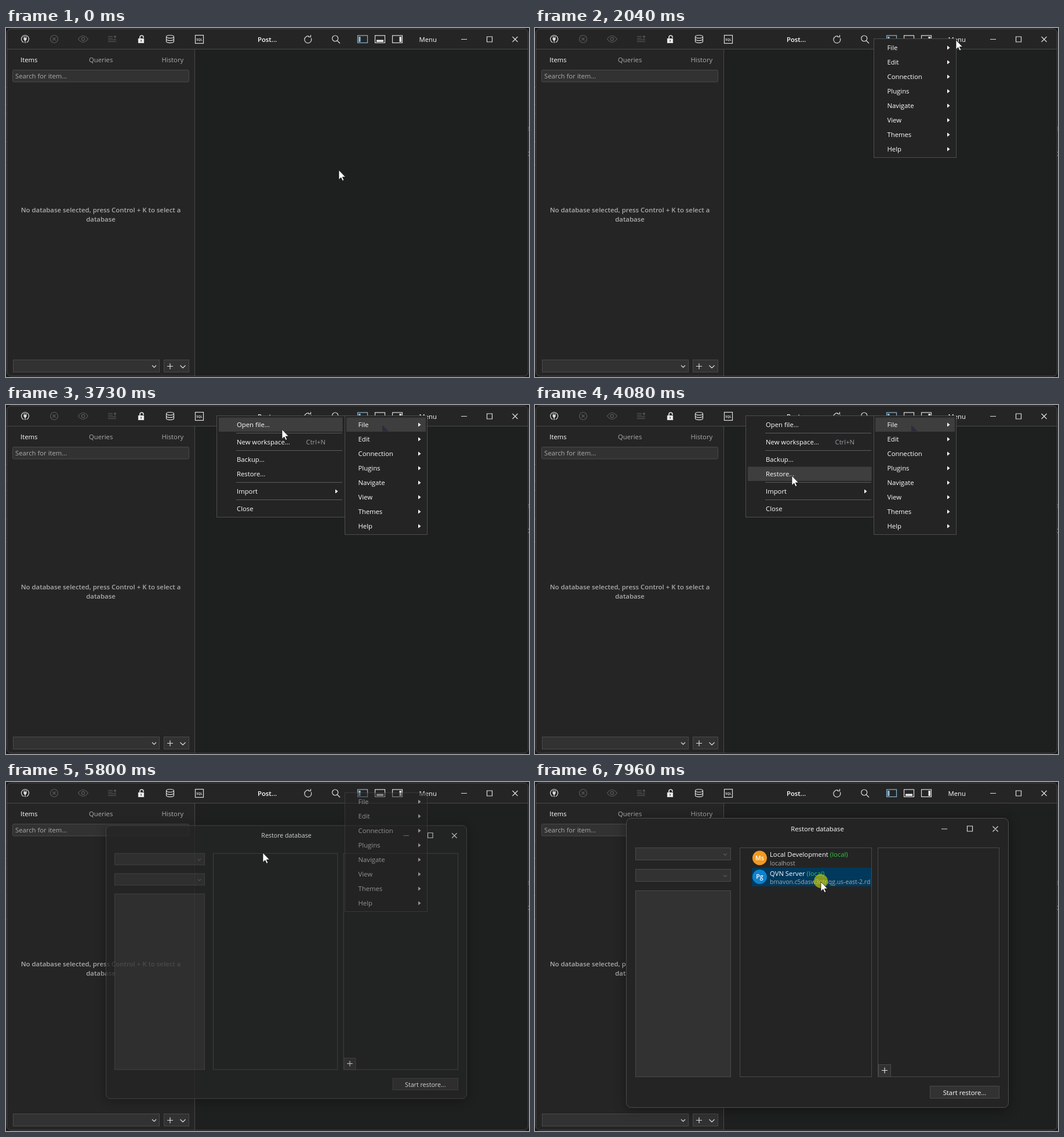
Recreate the animation shown at these times as an HTML page. Size 902x602 px, loop 8 s.

```html
<!DOCTYPE html>
<html lang="en">
<head>
<meta charset="utf-8">
<title>Restore database</title>
<style>
html, body { margin: 0; width: 100%; height: 100%; overflow: hidden; background: #191919; }
svg { display: block; width: 902px; height: 602px; font: 500 11.3px "Open Sans", "Noto Sans", sans-serif; fill: #fff; }
text { white-space: pre; }
.line { fill: none; stroke: #dedede; stroke-width: 1.2; }
.dim { stroke: #595959; }
.field { fill: #323232; stroke: #4a4a4a; }
.frame { fill: none; stroke: #4a4a4a; }
.panel { fill: #242424; stroke: #4d4d4d; }
.hot { fill: #3e3e3e; }
.mid { text-anchor: middle; }
.semi { font-weight: 600; }
.gray { fill: #acacac; }
.sub { font-size: 10.45px; fill: #a9a9a9; }
.local { fill: #31c944; }
</style>
</head>
<body>
<svg viewBox="0 0 902 602">
  <!-- slivers of the desktop behind the window -->
  <path stroke="#444" d="M0 102.5h2M0 131.5h2M0 147.5h2M0 196.5h2M0 236.5h2"/>
  <text class="gray" x="899" y="177">a</text>
  <text class="gray" x="899" y="221">C</text>

  <!-- main window -->
  <rect x="1.5" y="1.5" width="899" height="599" rx="7" fill="#252525"/>
  <path fill="#1e201f" d="M326 37h574v556a7 7 0 0 1-7 7H326z"/>
  <path class="frame" d="M2 36.5h898M325.5 37v563"/>
  <rect class="frame" x="1.5" y="1.5" width="899" height="599" rx="7"/>
  <rect class="hot" id="hover" x="698" y="2" width="60" height="34"/>

  <!-- toolbar -->
  <g class="line">
    <path d="M30.5 25A6.5 6.5 0 1 1 35.5 25"/>
    <path fill="#dedede" stroke-linejoin="round" d="M31.5 14v3M34.5 14v3M31 17.5h4v2l-1.500 2h-1l-1.500-2zM33 22v4"/>
    <g class="dim">
      <circle cx="83" cy="19" r="6.5"/><path d="M80.5 16.5l5 5m0-5l-5 5"/>
      <path d="M124.5 19q8.500-11 17 0q-8.500 11-17 0z"/><circle cx="133" cy="19" r="2.6"/>
      <path d="M176 14.5h8M176 17.5h8M176 20.5h14M176 23.5h14M188 19v-5.500m-2 2l2-2l2 2"/>
    </g>
    <path d="M231 18.5v-2.500a3 3 0 0 1 6 0v1" style="stroke-width:1.7"/>
    <rect x="228.5" y="18.5" width="9" height="7" fill="#eee"/>
    <ellipse cx="283" cy="15" rx="6.5" ry="2.5"/>
    <path d="M276.5 15v8c0 3.400 13 3.400 13 0v-8M276.5 19c0 3.400 13 3.400 13 0"/>
    <rect x="326.5" y="12.5" width="14" height="14"/>
    <path d="M526.3 17.500A6 6 0 1 1 523 14.400M525.5 12v3.500h-4"/>
    <circle cx="567.7" cy="18" r="5"/><path d="M571.5 22l4.500 4.500"/>
    <rect x="606.5" y="13" width="17" height="12.5" style="stroke:#8ab6d3"/>
    <rect x="636.5" y="13" width="17" height="12.5"/>
    <rect x="666.5" y="13" width="17" height="12.5"/>
    <path d="M785 19.5h10M829.5 15h9v9h-9zM873.5 15l9 9m0-9l-9 9"/>
  </g>
  <path fill="#8ab6d3" d="M608 15h3.500v9h-3.500z"/>
  <path fill="#eee" d="M639 20.5h12v3.500h-12zM678.5 15h3.500v9h-3.500z"/>
  <path fill="#252525" d="M232.5 20.5h1.200v3h-1.200z"/>
  <text class="mid semi" x="333.5" y="21.5" font-size="5.5">SQL</text>
  <text class="semi" x="434" y="24">Post...</text>
  <text x="712.5" y="24">Menu</text>

  <!-- sidebar -->
  <text x="25" y="59">Items</text>
  <text class="gray" x="143" y="59">Queries</text>
  <text class="gray" x="268.5" y="59">History</text>
  <rect class="field" x="11.5" y="72.5" width="304" height="20.5" rx="2"/>
  <text class="gray" x="16" y="87">Search for item...</text>
  <g class="mid semi gray" font-size="11.4">
    <text x="163.5" y="318">No database selected, press Control + K to select a</text>
    <text x="163.5" y="334">database</text>
  </g>
  <rect class="field" x="12.5" y="572.5" width="252" height="21"/>
  <rect class="field" x="272.5" y="572.5" width="43" height="21"/>
  <path class="line" d="M252 582l3.500 3.500l3.500-3.500M278 583.5h10M283 578.5v10M300.5 582l4.500 4.500l4.500-4.500"/>

  <!-- dialog -->
  <g id="dialog">
    <rect class="panel" x="157.5" y="62.5" width="659" height="499" rx="8" style="filter:drop-shadow(0 3px 10px rgba(0,0,0,.4))"/>
    <text class="mid" x="487" y="85">Restore database</text>
    <path class="line" d="M701 81h10M745.5 76h9v9h-9zM789.5 76.5l9 9m0-9l-9 9"/>
    <rect class="field" x="173.5" y="113.5" width="164" height="21"/>
    <rect class="field" x="173.5" y="150.5" width="164" height="21"/>
    <path class="line dim" d="M325 123.5l3 3l3-3M325 160.5l3 3l3-3"/>
    <rect class="field" x="173.5" y="187.5" width="164" height="321"/>
    <rect class="frame" x="353.5" y="113.5" width="227" height="395"/>
    <rect class="frame" x="591.5" y="113.5" width="209" height="395"/>
    <rect class="field" x="592.5" y="487.5" width="21" height="21"/>
    <path class="line" d="M598 497.5h10M603 492.5v10"/>
    <rect class="field" x="681.5" y="524.5" width="119" height="21"/>
    <text class="mid" x="741" y="540">Start restore...</text>
    <g id="list">
      <rect id="picked" x="374" y="148" width="206" height="32" fill="#00395c"/>
      <circle cx="387.5" cy="131" r="12.5" fill="#f3991f"/>
      <circle cx="387.5" cy="163.5" r="12.5" fill="#0d82cd"/>
      <g class="mid semi" font-size="10.5">
        <text x="387.5" y="135">Ms</text>
        <text x="387.5" y="167">Pg</text>
      </g>
      <text x="405" y="129">Local Development <tspan class="local">(local)</tspan></text>
      <text class="sub" x="405" y="144">localhost</text>
      <text x="405" y="162">QVN Server <tspan class="local">(local)</tspan></text>
      <clipPath id="clip"><path d="M354 114h225.500v394h-225.500z"/></clipPath>
      <text class="sub" x="405" y="176" clip-path="url(#clip)">bmavon.c5dasw3etnqg.us-east-2.rd</text>
    </g>
  </g>

  <g id="submenu">
    <rect class="panel" x="363.5" y="18.5" width="221" height="175"/>
    <rect class="hot" id="bar" x="367" width="213.5" height="24.5"/>
    <path class="frame" style="stroke:#5c5c5c" d="M397 48.5h183M397 78.5h183M397 133.5h183M397 163.5h183"/>
    <text x="517.5" y="68" fill="#9a9da6">Ctrl+N</text>
    <path d="M568 145.5l4.500 3.500l-4.500 3.500z"/>
  </g>
  <g id="menu">
    <rect class="panel" x="584.5" y="18.5" width="142" height="205"/>
    <g id="file">
      <rect class="hot" x="587" y="21.5" width="137" height="24.5"/>
      <path id="ghost" fill="#2d2d38" d="M649 34.5v11h11z"/>
    </g>
  </g>

  <circle id="click" r="12" fill="#d7d700" fill-opacity=".62"/>
  <path id="cursor" stroke="#111" stroke-width=".8" d="M0 0v16.500l3.800-3.500l2.600 5.500l2.500-1.100l-2.600-5.300h5.200z"/>
</svg>
<script>
const $ = id => document.getElementById(id);
const LOOP = 8000;

const addText = (parent, x, y, label) =>
  parent.insertAdjacentHTML('beforeend', `<text x="${x}" y="${y + 4}">${label}</text>`);

['File', 'Edit', 'Connection', 'Plugins', 'Navigate', 'View', 'Themes', 'Help'].forEach((label, i) => {
  const y = 34 + 25 * i;
  addText($('menu'), 607.5, y, label);
  $('menu').insertAdjacentHTML('beforeend', `<path d="M711 ${y - 3.5}l4.500 3.500l-4.500 3.500z"/>`);
});

const rows = [34, 64, 94, 119, 149, 179];
['Open file...', 'New workspace...', 'Backup...', 'Restore...', 'Import', 'Close']
  .forEach((label, i) => addText($('submenu'), 398, rows[i], label));

// Bursts of screen updates: start, end, number of steps
const bursts = [[0, 0, 1], [200, 270, 2], [530, 530, 1], [930, 1630, 11], [1760, 2040, 5],
  [2500, 3260, 11], [3330, 3470, 3], [3730, 4080, 6], [5600, 6010, 6], [7000, 7760, 11], [7960, 7960, 1]];

// Cursor path: time, x, y
const path = [[0, 574, 245], [200, 574, 244.5], [270, 575, 245], [530, 568, 245], [930, 569, 240],
  [1000, 575, 222], [1140, 610, 160], [1280, 672, 80], [1350, 694, 53], [1420, 708, 37],
  [1630, 726, 20], [2500, 726, 21], [2804, 714, 27], [3032, 690, 32], [3108, 649, 35],
  [3184, 600, 36], [3260, 555, 36.5], [3470, 480, 36.5], [3730, 476, 42], [4080, 443, 122],
  [6010, 443, 122], [7000, 443, 128], [7304, 423, 150], [7532, 452, 165], [7760, 493, 172], [LOOP, 493, 172]];

const ramp = (t, from, to) => Math.min(1, Math.max(0, (t - from) / (to - from)));
const show = (id, on) => $(id).setAttribute('visibility', on ? 'inherit' : 'hidden');
const fade = (id, value) => $(id).setAttribute('opacity', value);
const move = (id, x, y) => $(id).setAttribute('transform', `translate(${x} ${y})`);

function snap(t) {
  const [start, end, n] = bursts.findLast(b => b[0] <= t);
  const step = (end - start) / (n - 1) || 1;
  return Math.min(end, start + Math.floor((t - start) / step + 1e-6) * step);
}

function cursorAt(t) {
  const i = Math.max(1, path.findIndex(p => p[0] >= t));
  const [a, b] = [path[i - 1], path[i]];
  const k = ramp(t, a[0], b[0]);
  return [a[1] + (b[1] - a[1]) * k, a[2] + (b[2] - a[2]) * k];
}

function draw(now) {
  const t = snap(now % LOOP);
  const [x, y] = cursorAt(t);
  move('cursor', x, y);
  move('click', x, y - 1);
  show('click', (t >= 1760 && t < 1900) || (t >= 5600 && t < 5670) || t >= 7960);
  show('hover', t >= 1490 && t < 1900);

  fade('menu', ramp(t, 1760, 1970) * (1 - ramp(t, 5600, 5928)));
  show('file', t >= 2570 && t < 5670);
  show('ghost', t >= 3184 && t < 5670);
  fade('submenu', t < 5670 ? ramp(t, 2728, 2956) : 0);
  const row = rows.find(r => Math.abs(y - r) <= 12.5);
  show('bar', row && x < 580 && t >= 3260);
  if (row) $('bar').setAttribute('y', row - 12.5);

  const p = ramp(t, 5600, 5928);
  fade('dialog', Math.min(1, p * 1.6));
  $('dialog').setAttribute('transform',
    `translate(424.6 286) scale(${1 - 0.112 * (1 - p)}) translate(-424.6 -286)`);
  show('list', t >= 5928);
  show('picked', t >= 7960);
}

const begin = performance.now();
function tick() {
  draw(performance.now() - begin);
  requestAnimationFrame(tick);
}
tick();
</script>
</body>
</html>
```
